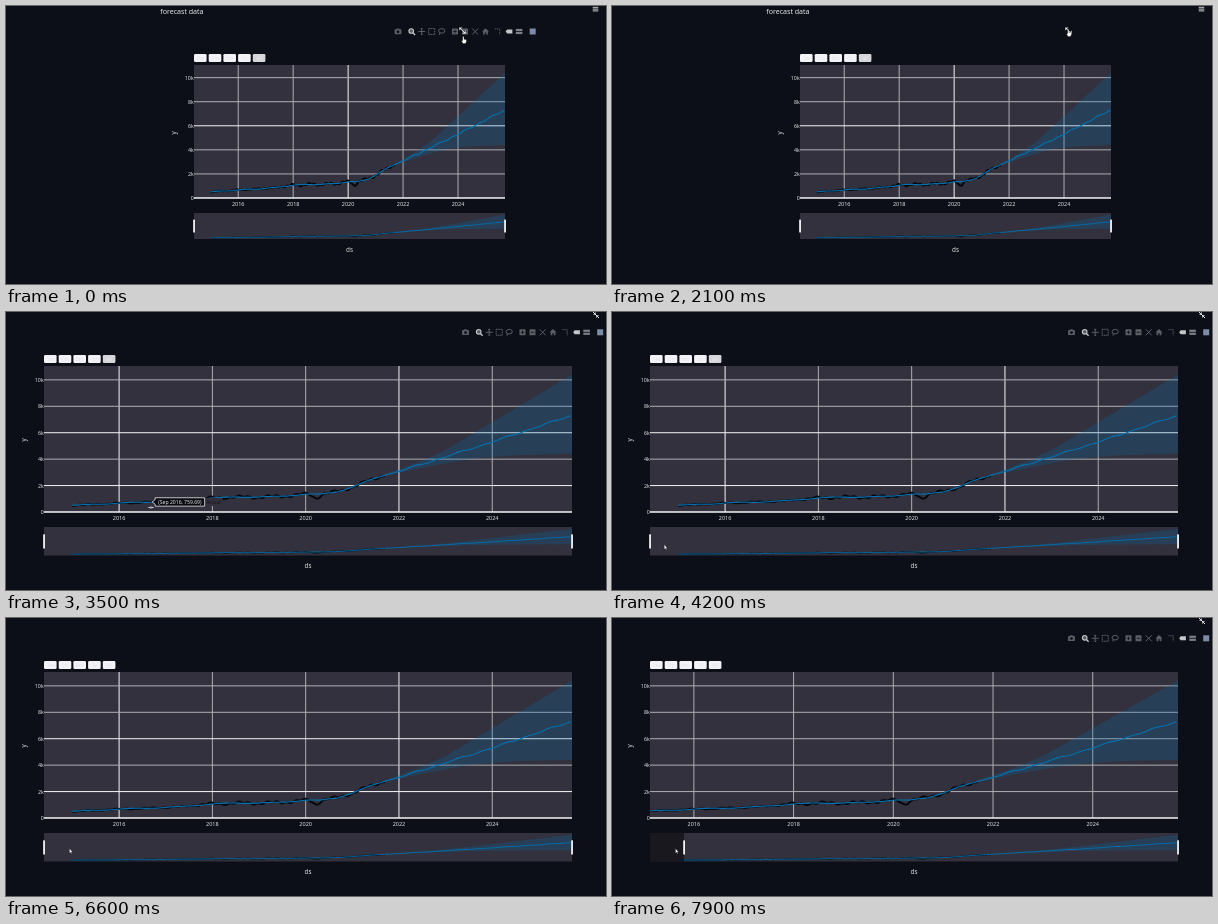
Animation of 600 by 278 pixels, one loop 8 s. Source, as an HTML page:

```html
<!DOCTYPE html>
<html lang="en">
<head>
<meta charset="utf-8">
<title>Forecast chart</title>
<style>
html, body { margin: 0; width: 100%; height: 100%; overflow: hidden; background: #0c0f17; }
svg { display: block; width: 100vw; height: 100vh; font-family: "Open Sans", sans-serif; }
</style>
</head>
<body>
<svg id="stage" viewBox="0 0 600 278"></svg>
<script>
const stage = document.getElementById('stage');
const LOOP = 8000, STEP = 100;
const START = 2014.39, END = 2025.71, TOP = 11050;
const PANEL = '#32313d', BLUE = '#0072b2', INK = '#05070c', PALE = '#f2f2f5';

const SMALL = { x: 188, y: 59, w: 311, h: 133, slideY: 207, slideH: 26, buttonY: 48,
  barX: 392, barY: 25.5, yTitle: [168, 127], dsTitle: [343.5, 246], strong: [2020, 6000] };
const LARGE = { x: 38, y: 54, w: 528, h: 146, slideY: 215, slideH: 28.5, buttonY: 43,
  barX: 459.5, barY: 20.3, yTitle: [18, 128], dsTitle: [302, 256.2], strong: [2016, 2022, 6000, 2000] };

const TREND = [[2015, 500], [2016, 670], [2016 + 8.5 / 12, 759.69], [2017.2, 830], [2018, 1060],
  [2018.5, 1130], [2019, 1130], [2019.5, 1190], [2020, 1350], [2020.3, 1330], [2020.7, 1560],
  [2021, 1880], [2021.4, 2450], [2021.7, 2800], [2022, 3080], [2023, 4180], [2024, 5300], [END, 7320]];
const UPPER = [[2021.7, 2850], [2022.5, 3900], [2023, 4700], [2024, 6800], [END, 10400]];
const LOWER = [[END, 4400], [2024.4, 4280], [2023.5, 4020], [2022.5, 3350], [2021.7, 2750]];
const CURSOR_X = [[0, 458], [100, 458], [500, 457], [2400, 457], [2800, 340], [3100, 215],
  [3500, 145], [3700, 112], [4100, 58], [4500, 39], [5600, 39], [6300, 64.5]];
const CURSOR_Y = [[0, 34], [100, 34], [500, 27], [2400, 27], [2800, 120], [3100, 183],
  [3500, 195.5], [3700, 202], [4100, 236], [4500, 232.5], [6300, 233]];

function interpolate(points, x) {
  if (x <= points[0][0]) return points[0][1];
  for (let i = 1; i < points.length; i++) {
    const [x0, y0] = points[i - 1], [x1, y1] = points[i];
    if (x <= x1) return y0 + (y1 - y0) * (x - x0) / (x1 - x0);
  }
  return points[points.length - 1][1];
}

function sample(from, to, step, f) {
  const out = [];
  for (let x = from; x <= to; x += step) out.push([x, f(x)]);
  return out;
}

const forecast = sample(2015, END, 0.06, x =>
  interpolate(TREND, x) + 25 * Math.sin(x * 2 * Math.PI) + (x > 2022 ? 35 * Math.sin(x * 13) : 0));
const actual = sample(2015, 2021.72, 0.025, x => {
  const size = x < 2017.7 ? 0.35 : 1;
  const dip = -270 * Math.exp(-(((x - 2020.22) / 0.09) ** 2));
  return interpolate(TREND, x) + size * (75 * Math.sin(x * 9.5 + 1) + 50 * Math.sin(x * 31)) + dip;
});

const rect = (x, y, w, h, fill, extra = '') =>
  `<rect x="${x}" y="${y}" width="${w}" height="${h}" fill="${fill}" ${extra}/>`;
const path = (d, stroke, width = 1, extra = '') =>
  `<path d="${d}" fill="none" stroke="${stroke}" stroke-width="${width}" ${extra}/>`;
const text = (x, y, size, content, anchor = 'middle', fill = PALE, extra = '') =>
  `<text x="${x}" y="${y}" font-size="${size}" text-anchor="${anchor}" fill="${fill}" ${extra}>${content}</text>`;
const at = (x, y, content, opacity = 1) =>
  `<g transform="translate(${x} ${y})" opacity="${opacity}">${content}</g>`;

function series(box, from, thin) {
  const px = x => box.x + (x - from) / (END - from) * box.w;
  const py = y => box.y + box.h * (1 - y / TOP);
  const trace = points => 'M' + points.map(([x, y]) => px(x).toFixed(2) + ' ' + py(y).toFixed(2)).join('L');
  return `<path d="${trace([...UPPER, ...LOWER])}Z" fill="${BLUE}" fill-opacity=".22"/>` +
    path(trace(actual), INK, thin ? 1.3 : 2, 'stroke-linejoin="round"') +
    path(trace(forecast), BLUE, thin ? 0.9 : 1.1);
}

function chart(v, from) {
  const px = x => v.x + (x - from) / (END - from) * v.w;
  const py = y => v.y + v.h * (1 - y / TOP);
  const tone = value => v.strong.includes(value) && from === START ? '#f5f5f7' : '#aeaeb4';
  let out = rect(v.x, v.y, v.w, v.h, PANEL);
  for (let year = 2016; year <= 2024; year += 2) {
    const x = px(year);
    out += path(`M${x} ${v.y}V${v.y + v.h}`, tone(year));
    out += text(x, v.y + v.h + 7.8, 5.5, year);
  }
  for (let k = 0; k <= 10; k += 2) {
    const y = py(k * 1000);
    if (k) out += path(`M${v.x} ${y}H${v.x + v.w}`, tone(k * 1000));
    out += text(v.x - 0.3, y + 2, 5.3, k ? k + 'k' : '0', 'end');
  }
  out += path(`M${v.x} ${v.y + v.h}H${v.x + v.w}`, '#f5f5f7', 1.5);
  out += `<clipPath id="plot">${rect(v.x, v.y, v.w, v.h, '#000')}</clipPath>`;
  out += `<g clip-path="url(#plot)">${series(v, from)}</g>`;
  const [tx, ty] = v.yTitle;
  out += text(tx, ty, 6.3, 'y', 'middle', PALE, `transform="rotate(-90 ${tx} ${ty})" dy="1.5"`);
  return out + text(...v.dsTitle, 6.3, 'ds');
}

function slider(v, from) {
  const box = { x: v.x, y: v.slideY, w: v.w, h: v.slideH };
  const left = v.x + (from - START) / (END - START) * v.w;
  const handle = x => rect(x - 0.8, box.y + box.h / 4, 1.7, box.h / 2, '#fff', 'rx=".5"');
  return rect(box.x, box.y, box.w, box.h, PANEL) + series(box, START, true) +
    rect(box.x, box.y, left - box.x, box.h, '#000', 'opacity=".5"') +
    handle(left) + handle(v.x + v.w);
}

function buttons(v, allActive) {
  return ['1w', '1m', '6m', '1y', 'all'].map((label, i) => {
    const x = v.x + i * 14.7, active = allActive && i === 4;
    return rect(x, v.buttonY, 12.6, 8, active ? '#d6d6da' : '#f3f2f7', 'rx="1.3"') +
      text(x + 6.3, v.buttonY + 5.8, 5, label, 'middle', active ? '#ededf1' : '#e2e2e8');
  }).join('');
}

function modebar(v, opacity) {
  const dim = '#5b5e65', lit = '#c4c6ca';
  const line = (d, color = dim, w = 1) => path(d, color, w);
  const square = color => rect(-3, -3, 6, 6, color, 'rx=".6"');
  const icons = [
    [0, rect(-3.4, -2.2, 6.8, 5, dim, 'rx=".7"') + rect(-1.4, -3, 2.8, 1.4, dim) +
      `<circle cy=".3" r="1.4" fill="#0c0f17"/>`],
    [13.7, `<circle cx="-.5" cy="-.5" r="2.3" fill="${dim}" stroke="${lit}" stroke-width="1.1"/>` +
      line('M1.2 1.2L3.4 3.4', lit, 1.4)],
    [23.7, line('M-3.4 0H3.4M0-3.4V3.4') + line('M-1-2.4L0-3.4L1-2.4M-1 2.4L0 3.4L1 2.4')],
    [33.7, path('M-3-3H3V3H-3Z', dim, 1, 'stroke-dasharray="1.5 .6"')],
    [43.7, `<ellipse cy="-.6" rx="3.1" ry="2.3" fill="none" stroke="${dim}"/>` + line('M-1.8 1L-2.2 3.4')],
    [57, square(dim) + line('M-1.8 0H1.8M0-1.8V1.8', '#0c0f17', 0.8)],
    [67, square(dim) + line('M-1.8 0H1.8', '#0c0f17', 0.8)],
    [77.2, line('M-3-3L3 3M3-3L-3 3')],
    [87.5, `<path d="M-3.4 0L0-3.2L3.4 0H2.4V3H.7V1H-.7V3H-2.4V0Z" fill="${dim}"/>`],
    [99.5, path('M-2.5-2.6H2.2V3', dim, 1, 'stroke-dasharray="1.2 .7"')],
    [111, `<path d="M-3.4 0L-1.8-2H3.4V2H-1.8Z" fill="${lit}"/>`],
    [121, rect(-3.2, -2.6, 6.6, 2.2, '#7c7f85') + rect(-3.2, 0.4, 6.6, 2.2, '#7c7f85')],
    [134.7, rect(-3, -3, 6, 6, '#7d8ba6')]
  ];
  return at(v.barX, v.barY, icons.map(([x, icon]) => at(x, 0, icon)).join(''), opacity);
}

const expandIcon = path('M-2.6-2.6L2.6 2.6', '#e8e8ea', 1) +
  '<path d="M-3.2-3.2H0L-3.2 0ZM3.2 3.2H0L3.2 0Z" fill="#e8e8ea"/>';
const collapseIcon = path('M-3-3L3 3', '#e8e8ea', 1) +
  '<path d="M-.3-.3H-2.9L-.3-2.9ZM.3.3H2.9L.3 2.9Z" fill="#e8e8ea"/>';

const cursors = {
  hand: '<path d="M-1.3-3.4H0V-.8L2.4-.2V1.8L1.4 3.6H-1L-2.5 1L-1.3 .6Z" fill="#fff" stroke="#111" stroke-width=".3"/>',
  arrow: '<path d="M-1-2.6V2.2L.1 1.2L.9 2.8L1.5 2.5L.8 1H2Z" fill="#fff" stroke="#111" stroke-width=".3"/>',
  cross: path('M-2.6 0H-.7M.7 0H2.6M0-1.2V1.2', '#f0f0f0', 0.9),
  resize: '<path d="M-3.2 0L-1.4-1.4V1.4ZM3.2 0L1.4-1.4V1.4Z" fill="#f0f0f0"/>'
};

function cursorKind(t) {
  if (t < 2200) return 'hand';
  if (t < 2700) return 'arrow';
  if (t < 3800) return 'cross';
  return t < 4400 || t >= 5700 ? 'arrow' : 'resize';
}

function hover(v, cursorX) {
  const year = START + (cursorX - v.x) / v.w * (END - START);
  const month = Math.floor(year * 12), snapped = (month + 0.5) / 12;
  const value = interpolate(TREND, snapped);
  const x = v.x + (snapped - START) / (END - START) * v.w;
  const y = v.y + v.h * (1 - value / TOP);
  const name = 'Jan Feb Mar Apr May Jun Jul Aug Sep Oct Nov Dec'.split(' ')[month % 12];
  return at(x, y,
    rect(2.5, -4, 68, 8, PANEL) +
    '<path d="M0 0L3-2.2V-4.2H52.5V4.2H3V2.2Z" fill="#0a0c12" stroke="#e8e8ea" stroke-width=".8"/>' +
    text(27.8, 1.8, 5.1, `(${name} ${Math.floor(month / 12)}, ${value.toFixed(2)})`) +
    text(54, 1.8, 5.1, 'Actual', 'start', '#15151c'));
}

function barOpacity(t) {
  return interpolate([[0, 1], [300, 1], [600, 0], [2100, 0], [2200, 0.5], [2400, 1],
    [5700, 1], [5900, 0], [7300, 0], [7500, 1]], t);
}

function render(t) {
  const small = t < 2200;
  const v = small ? SMALL : LARGE;
  const from = interpolate([[6700, START], [7100, 2015.12]], t);
  const x = interpolate(CURSOR_X, t), y = interpolate(CURSOR_Y, t);
  const dragging = t >= 5800 && t < 7300;
  let out = rect(0, 0, 600, 278, '#0c0f17') + chart(v, from) + slider(v, from) +
    buttons(v, t < 5800) + modebar(v, barOpacity(t));
  if (small) {
    out += text(154.3, 8.4, 7.1, 'forecast data', 'start') +
      path('M586.7 1.3H592.3M586.7 3.1H592.3M586.7 4.9H592.3', '#e0e0e3', 0.9) +
      at(456.5, 24.6, expandIcon);
  } else if (!dragging) {
    out += at(590, 3, collapseIcon);
  }
  if (t >= 3100 && t <= 3600) out += hover(v, x);
  stage.innerHTML = out + at(x, y, cursors[cursorKind(t)]);
}

let shown = -1;
function tick() {
  const t = Math.floor(performance.now() % LOOP / STEP) * STEP;
  if (t !== shown) render(shown = t);
  requestAnimationFrame(tick);
}
tick();
</script>
</body>
</html>
```
